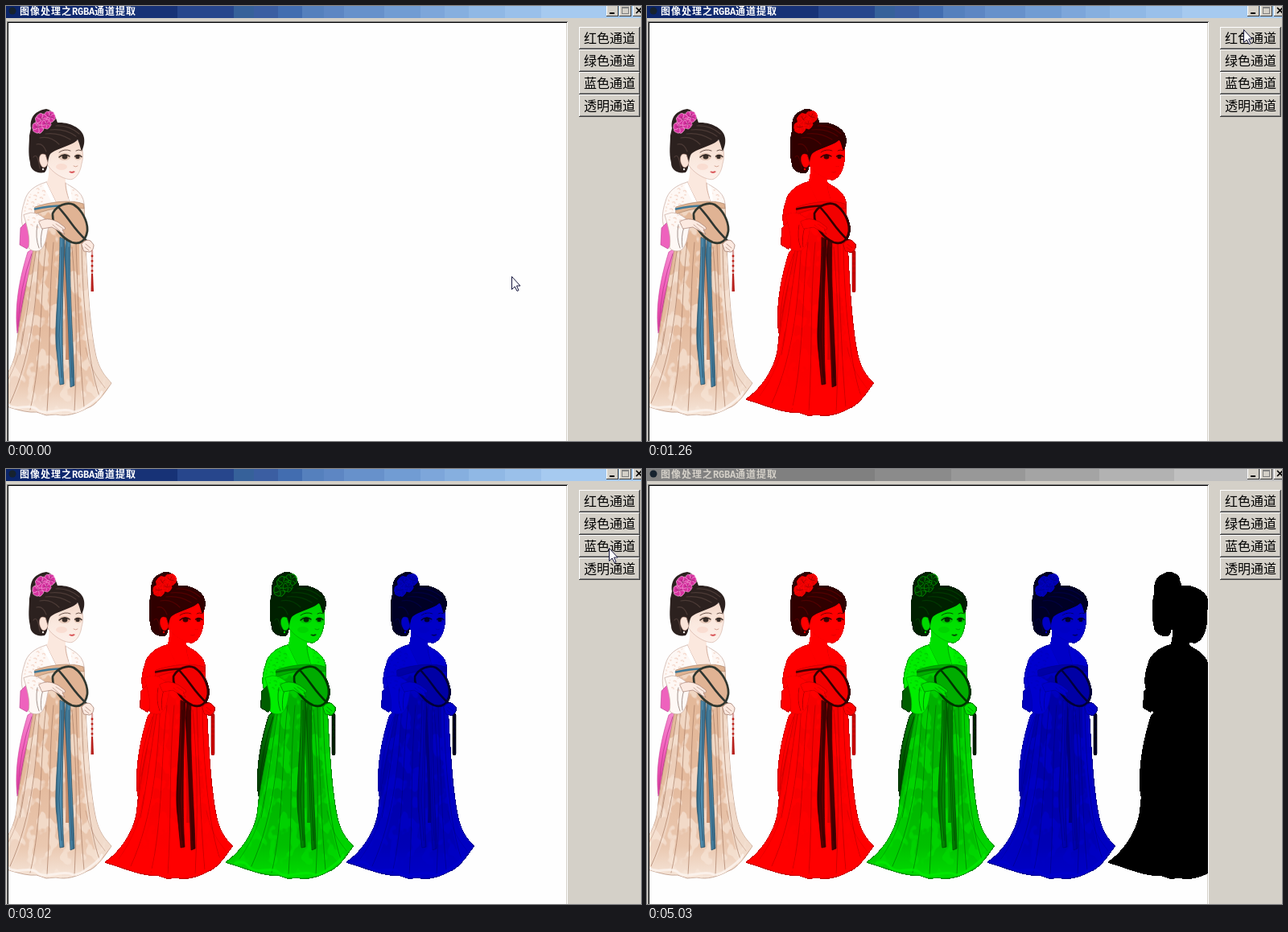
Write an HTML page that moves like this. It is 789 px wide and 541 px high and loops after 5.58 s.

```html
<!DOCTYPE html>
<html lang="zh-CN">
<head>
<meta charset="utf-8">
<title>图像处理</title>
<style>
:root {
  --loop: 5580ms;
  --face: #d4d0c8;
  --out: inset -1px -1px #404040, inset 1px 1px #fff, inset -2px -2px #808080;
  --in: inset 1px 1px #808080, inset -1px -1px #fff, inset 2px 2px #404040;
}
html, body { margin: 0; width: 100%; height: 100%; overflow: hidden; background: var(--face); }
.stage { position: relative; width: 789px; height: 541px; overflow: hidden; background: var(--face); }
.stage > * { position: absolute; }
svg { display: block; }

.bar {
  left: 0; top: 0; width: 789px; height: 15px; overflow: hidden; white-space: pre; color: #fff;
  background: linear-gradient(90deg,
    #0a246a 70px, #10296f 70px 130px, #173276 130px 213px, #27468c 213px 283px,
    #36619a 283px 308px, #3b5ea2 308px 338px, #426db0 338px 368px, #5580bd 368px 395px,
    #5d86c3 395px 420px, #6791cb 420px 470px, #719cd3 470px 515px, #7da6da 515px 545px,
    #86afdf 545px 575px, #90b8e5 575px 620px, #9ac0ea 620px 665px, #a6caf0 665px);
  font: bold 12px/14px "Noto Sans CJK SC", "Noto Sans CJK", sans-serif;
}
.bar b { position: absolute; left: 17px; top: -1px; letter-spacing: 1px; }
.bar i { font: bold 12px/14px "Liberation Mono", monospace; letter-spacing: -.2px; }
.bar.idle {
  color: var(--face);
  background: linear-gradient(90deg, #808080 283px, #8b8b8b 283px 378px, #989898 378px 470px,
    #a4a4a4 470px 562px, #b2b2b2 562px 655px, #c0c0c0 655px);
  animation: idle var(--loop) step-end infinite;
}
.view {
  left: 1px; top: 19px; width: 697px; height: 530px; background: #fefefe;
  box-shadow: inset 1px 1px #808080, inset -1px -1px #fff, inset 2px 2px #000, inset -2px -2px var(--face);
}
.btn {
  left: 712px; top: calc(26px + 28px * var(--n)); width: 76px; height: 28px; box-sizing: border-box;
  background: var(--face); box-shadow: var(--out); text-align: center; color: #000;
  font: 16px/27px "Noto Sans CJK SC", "Noto Sans CJK", sans-serif;
  animation: press var(--loop) calc(var(--t) - var(--loop)) step-end infinite;
}
.btn.tap { animation-name: tap; }
.cursor { animation: move var(--loop) step-end infinite; }
.copy { animation: var(--show) var(--loop) step-end infinite; }

@keyframes press {
  0% { box-shadow: var(--in); padding: 1px 0 0 2px; }
  3.2258%, 100% { box-shadow: var(--out); padding: 0; }
}
@keyframes tap {
  0% { box-shadow: var(--in); padding: 1px 0 0 2px; }
  1.9713%, 100% { box-shadow: var(--out); padding: 0; }
}
@keyframes idle  { 0% { opacity: 0 } 90.1434%, 100% { opacity: 1 } }
@keyframes red   { 0% { opacity: 0 } 22.5806%, 100% { opacity: 1 } }
@keyframes green { 0% { opacity: 0 } 39.9642%, 100% { opacity: 1 } }
@keyframes blue  { 0% { opacity: 0 } 54.1219%, 100% { opacity: 1 } }
@keyframes alpha { 0% { opacity: 0 } 68.9964%, 100% { opacity: 1 } }
@keyframes move {
  0% { transform: translate(628px, 336px); }
  5.5556% { transform: translate(628px, 336px); animation-timing-function: steps(5, start); }
  10.9319% { transform: translate(698px, 176px); animation-timing-function: steps(5, start); }
  16.3082% { transform: translate(724px, 57px); animation-timing-function: steps(3, start); }
  19.3548% { transform: translate(741px, 29px); }
  27.0609% { transform: translate(741px, 29px); animation-timing-function: steps(6, start); }
  33.5125% { transform: translate(745px, 69px); }
  45.6989% { transform: translate(745px, 69px); animation-timing-function: steps(4, start); }
  50% { transform: translate(749px, 98px); }
  57.3477% { transform: translate(749px, 98px); animation-timing-function: steps(4, start); }
  61.4695% { transform: translate(751px, 122px); }
  71.147% { transform: translate(751px, 122px); animation-timing-function: steps(2, start); }
  73.2975% { transform: translate(800px, 132px); }
  79.9283% { transform: translate(784px, 533px); }
  81.1828%, 100% { transform: translate(800px, 560px); }
}
</style>
</head>
<body>
<div class="stage">
  <div class="bar"><b>图像处理之<i>RGBA</i>通道提取</b></div>
  <div class="bar idle"><b>图像处理之<i>RGBA</i>通道提取</b></div>
  <div class="view"></div>
  <div class="btn" style="--n:0;--t:1080ms">红色通道</div>
  <div class="btn" style="--n:1;--t:2050ms">绿色通道</div>
  <div class="btn" style="--n:2;--t:2840ms">蓝色通道</div>
  <div class="btn tap" style="--n:3;--t:3740ms">透明通道</div>

  <svg width="789" height="541" viewBox="0 0 789 541" style="left:0;top:0">
    <defs>
      <!-- each filter keeps one channel and hardens the alpha edge -->
      <filter id="fR" color-interpolation-filters="sRGB"><feColorMatrix values="1.08 0 0 0 0  0 0 0 0 0  0 0 0 0 0  0 0 0 20 0"/></filter>
      <filter id="fG" color-interpolation-filters="sRGB"><feColorMatrix values="0 0 0 0 0  0 .96 0 0 0  0 0 0 0 0  0 0 0 20 0"/></filter>
      <filter id="fB" color-interpolation-filters="sRGB">
        <feColorMatrix values="0 0 0 0 0  0 0 0 0 0  0 0 1 0 0  0 0 0 20 0"/>
        <feComponentTransfer><feFuncB type="table" tableValues="0 .3 .6 .75 .82"/></feComponentTransfer>
      </filter>
      <filter id="fA" color-interpolation-filters="sRGB"><feColorMatrix values="0 0 0 0 0  0 0 0 0 0  0 0 0 0 0  0 0 0 20 0"/></filter>
      <filter id="mottle" color-interpolation-filters="sRGB">
        <feTurbulence type="fractalNoise" baseFrequency=".075 .06" numOctaves="2" seed="8"/>
        <feColorMatrix values="0 0 0 0 .97  0 0 0 0 .9  0 0 0 0 .85  0 12 0 0 -6.2"/>
        <feComposite in2="SourceAlpha" operator="in"/>
      </filter>

      <linearGradient id="silk" x2="0" y2="1">
        <stop offset="0" stop-color="#e3b797"/><stop offset=".55" stop-color="#e4ba9d"/>
        <stop offset=".85" stop-color="#eac8b0"/><stop offset="1" stop-color="#f6e6da"/>
      </linearGradient>
      <linearGradient id="pink" x2="0" y2="1">
        <stop offset="0" stop-color="#f58cd0"/><stop offset=".5" stop-color="#f25cba"/><stop offset="1" stop-color="#dc3ca0"/>
      </linearGradient>
      <linearGradient id="sash" x2="1" y2="0">
        <stop offset="0" stop-color="#2f6480"/><stop offset=".5" stop-color="#5592b4"/><stop offset="1" stop-color="#2d5f7c"/>
      </linearGradient>
      <linearGradient id="skin" x2="0" y2="1">
        <stop offset="0" stop-color="#f4d8c9"/><stop offset=".5" stop-color="#fae8de"/><stop offset="1" stop-color="#fdf0ea"/>
      </linearGradient>
      <pattern id="lace" width="8" height="9" patternUnits="userSpaceOnUse" patternTransform="rotate(20)">
        <path d="M1 3q2-3 4 0M4 7l2-1" stroke="#efc9b8" stroke-width="1.2" fill="none"/>
      </pattern>
      <path id="gown" d="M36 250C50 243 82 240 97 246L99 300C102 360 105 405 112 436 117 455 125 462 131 469 122 482 112 497 101 500 88 507 75 511 62 508L50 509 38 505C20 507-8 494-27 489-10 478 10 452 13 425 16 385 30 330 36 290z"/>
      <clipPath id="inGown"><use href="#gown"/></clipPath>
      <path id="petal" d="M0 0C-6-3-5-7-1-7 4-9 6-4 0 0z"/>
      <g id="flower" stroke="#f6b0de" stroke-width=".7">
        <use href="#petal"/><use href="#petal" transform="rotate(72)"/><use href="#petal" transform="rotate(144)"/>
        <use href="#petal" transform="rotate(216)"/><use href="#petal" transform="rotate(288)"/>
        <path d="M0 0V-4M0 0L4-1M0 0L-4-1" stroke="#8f1768"/>
      </g>

      <g id="lady" stroke-linecap="round" stroke-linejoin="round">
        <path d="M36 300L27 306C18 335 10 370 14 407 20 392 34 352 40 304z" fill="url(#pink)" stroke="#c33b92" stroke-width=".6"/>
        <path d="M32 308Q17 350 15 398M35 312Q24 345 18 382" fill="none" stroke="#b93a8d" stroke-width=".8"/>

        <use href="#gown" fill="url(#silk)" stroke="#b28a74" stroke-width=".7"/>
        <g clip-path="url(#inGown)">
          <path d="M91 295L99 300C102 360 106 410 113 438L131 469 115 489C98 430 91 370 91 295z" fill="#f6e4d8" opacity=".7"/>
          <path d="M36 308C28 370 20 420-16 487L5 497C38 440 34 370 43 300z" fill="#f5dfd0" opacity=".55"/>
          <use href="#gown" filter="url(#mottle)" opacity=".65"/>
          <path d="M73 295C75 340 80 400 78 440L74 440C76 390 70 340 70 295z" fill="#c78e6d"/>
          <g fill="none" stroke="#a87b63" stroke-width=".7">
            <path d="M42 292C38 360 34 430 5 494M50 294C42 360 45 440 30 502M59 294C52 370 56 430 51 505M87 296C90 380 92 440 97 499M94 296C95 370 103 450 116 485M82 300C89 380 88 440 85 505M38 300C30 350 24 400 17 434"/>
            <path d="M21 405C17 440 4 465-10 485M99 425C105 455 117 466 123 475" opacity=".6"/>
          </g>
          <path d="M-15 490Q-4 487 1 494T20 499 39 502 60 504 82 504 103 496 119 480" fill="none" stroke="#fdf6f0" stroke-width="3" opacity=".8"/>
        </g>
        <path d="M67 288C67 350 59 400 63 430L67 471 72 470C69 430 70 350 73 290z" fill="url(#sash)" stroke="#274c60" stroke-width=".7"/>
        <path d="M75 288L80 290C78 350 84 420 85 472L80 474C78 420 76 350 73 310z" fill="url(#sash)" stroke="#274c60" stroke-width=".7"/>
        <path d="M69 300Q69 360 66 410L69 462M78 300Q77 370 82 462" fill="none" stroke="#244b66" stroke-width=".7"/>

        <path d="M50 219C36 223 26 230 23 243 18 258 18 270 23 279L42 262 37 251 97 246C96 234 88 228 75 221z" fill="#fef8f5" stroke="#c7aaa0" stroke-width=".7"/>
        <path d="M46 222C30 230 23 240 22 262L40 258 52 230zM80 226C91 231 95 238 95 245L84 244z" fill="url(#lace)"/>
        <path d="M53 198C54 210 52 216 50 222L62 244 77 243C78 234 73 224 74 212z" fill="#fbe8de"/>
        <path d="M50 219C55 230 59 237 62 244M74 220C74 230 77 236 79 243" fill="none" stroke="#c9a293" stroke-width=".8"/>
        <path d="M50 219L46 224 57 244 62 244zM75 221L80 225 82 243 79 243z" fill="#fff"/>
        <path d="M36 250C52 244 80 240 96 246L97 252C80 248 56 251 36 259z" fill="#dfb392" stroke="#a77d62" stroke-width=".6"/>
        <path d="M36 252.500Q56 248 73 248.500" fill="none" stroke="#3f7896" stroke-width="2.6"/>

        <path d="M25 269L18 276 17 297 26 302 33 290z" fill="#ee62bd" stroke="#b53b8c" stroke-width=".6"/>
        <path d="M22 260C28 280 30 290 28 301 34 307 44 306 47 298 52 288 50 278 55 272 48 262 38 257 31 257z" fill="#fef8f5" stroke="#c7aaa0" stroke-width=".7"/>
        <path d="M24 263L40 260 47 268 37 282z" fill="url(#lace)"/>
        <path d="M39 272Q36 288 41 301M46 275Q42 287 44 300" fill="none" stroke="#8d7a74" stroke-width=".8"/>

        <path d="M58 258C63 248 76 243 84 247 94 253 102 268 101 280 99 292 92 297 82 294 70 289 57 274 58 258z" fill="#e0b394" stroke="#30372f" stroke-width="2.7"/>
        <path d="M65 250Q74 260 81 270T102 294" fill="none" stroke="#2f3632" stroke-width="2.6"/>
        <path d="M41 268C51 262 59 266 65 269L73 275Q75 279 70 278L73 284 64 279 57 275 45 277z" fill="#fceae1" stroke="#a57f71" stroke-width=".7"/>
        <path d="M62 271L71 277M58 272L67 280" stroke="#a57f71" stroke-width=".6"/>
        <path d="M94 296Q99 289 105 292L109 297Q109 304 104 306L97 305z" fill="#fceae1" stroke="#a57f71" stroke-width=".8"/>
        <path d="M99 296L105 301M98 300L103 304" stroke="#a57f71" stroke-width=".7"/>
        <path d="M107 306V354" stroke="#a01810" stroke-width="4.500" opacity=".06"/>
        <path d="M107 304V334" stroke="#b23026" stroke-width=".8"/>
        <path d="M107 311V332" stroke="#bd2018" stroke-width="2.8" stroke-dasharray=".1 6"/>
        <path d="M106 333H108L109 355H105.500z" fill="#b7201c"/>

        <path d="M56 178C68 165 88 160 94 174 96 182 96 190 94 196 93 204 89 213 82 215.500 76 217 58 210 50 195z" fill="url(#skin)" stroke="#cfaa9c" stroke-width=".6"/>
        <ellipse cx="69" cy="200" rx="7" ry="4" fill="#f8c9b8" opacity=".4"/>
        <path d="M31 152C29 138 37 130 50 128 60 130 62 140 64 145 80 144 96 153 97 164 98 171 96 176 94 181 92 175 91 170 89 166 83 174 64 176 55 184 51 190 53 202 48 207 38 209 30 204 30 195 27 182 29 172 29 161z" fill="#2c211f"/>
        <g fill="none" stroke="#5a4641" stroke-width="1.2" opacity=".7">
          <path d="M62 149Q78 148 91 159M55 154Q73 152 87 162M49 159Q65 157 80 166M42 164Q55 161 66 172M38 172Q46 170 50 181M34 188Q39 181 42 202M35 148Q38 136 47 133"/>
        </g>
        <path d="M49 185C41 181 40 191 43 197 46 204 51 200 52 195z" fill="#fae3d8" stroke="#b68e80" stroke-width=".6"/>
        <circle cx="46" cy="203" r="1.2" fill="#f4eee9"/>

        <path d="M66 182Q73 177 80 180M87 180Q90 178 93 179.500" fill="none" stroke="#6d554c" stroke-width="1"/>
        <ellipse cx="72.500" cy="187.500" rx="7.500" ry="4.500" fill="#c99f88" opacity=".45"/>
        <ellipse cx="89.500" cy="187.500" rx="5" ry="4" fill="#c99f88" opacity=".45"/>
        <ellipse cx="73" cy="187.500" rx="3.400" ry="2.900" fill="#3a2e28"/>
        <ellipse cx="89" cy="187.500" rx="2.600" ry="2.600" fill="#3a2e28"/>
        <path d="M66 188Q72 182.500 79 187M85.500 187Q89.500 183.500 94 187.500" fill="none" stroke="#2c2320" stroke-width="1.2"/>
        <path d="M84 199Q87 201 89 199" fill="none" stroke="#c99482" stroke-width=".8"/>
        <path d="M78 206Q80 205 82 206 84 204.500 86 206 82 210 78 206z" fill="#d9575a"/>

        <g fill="#d632a0">
          <use href="#flower" transform="translate(40 151)"/>
          <use href="#flower" transform="translate(54 138) rotate(25)"/>
          <use href="#flower" transform="translate(44 141) rotate(50)"/>
          <use href="#flower" transform="translate(50 147) rotate(10) scale(.8)"/>
        </g>
      </g>
    </defs>

    <svg x="3" y="21" width="694" height="520" viewBox="3 21 694 520">
      <use href="#lady"/>
      <g class="copy" style="--show:red"><use href="#lady" x="150" filter="url(#fR)"/></g>
      <g class="copy" style="--show:green"><use href="#lady" x="300" filter="url(#fG)"/></g>
      <g class="copy" style="--show:blue"><use href="#lady" x="450" filter="url(#fB)"/></g>
      <g class="copy" style="--show:alpha"><use href="#lady" x="600" filter="url(#fA)"/></g>
    </svg>

    <circle cx="8" cy="6" r="4.500" fill="#16222e"/>
    <g shape-rendering="crispEdges">
      <path d="M746 0h15v13h-15zM762 0h15v13h-15zM779 0h15v13h-15z" fill="#d4d0c8"/>
      <path d="M746.500 0v12M762.500 0v12M779.500 0v12" stroke="#fff"/>
      <path d="M746 12.500h14.500v-13M762 12.500h14.500v-13M779 12.500h14" fill="none" stroke="#404040"/>
      <path d="M750 8h6v2h-6z"/>
      <path d="M765.500 1.500h8v8h-8zM765 2.500h9" fill="none" stroke="#808080"/>
    </g>
    <path d="M783 2l7 7M790 2l-7 7" stroke="#000" stroke-width="1.600"/>

    <g class="cursor">
      <path d="M.5.5V16.500L4.200 13 7 18.500 9 17.600 6.500 12H11z" fill="#fff" stroke="#15153c"/>
    </g>
  </svg>
</div>
</body>
</html>
```
